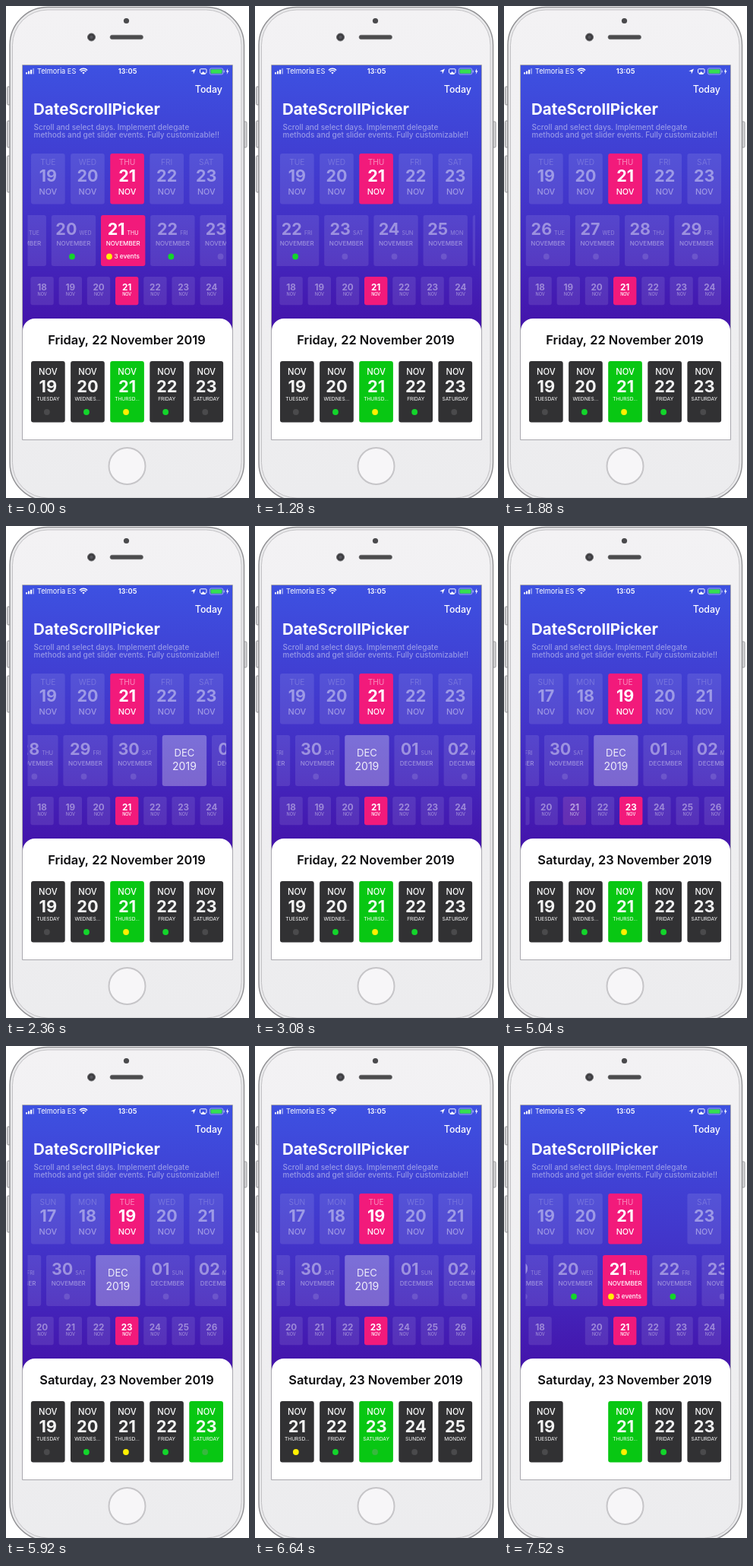
Animation of 320x647 px, one loop 7.56 s. Source, as an HTML page with a canvas:

```html
<!DOCTYPE html>
<html lang="en">
<head>
<meta charset="utf-8">
<title>DateScrollPicker</title>
<style>
html, body { margin: 0; width: 100%; height: 100%; overflow: hidden; background: #fff; }
canvas { display: block; width: 320px; height: 647px; }
</style>
</head>
<body>
<canvas id="stage"></canvas>
<script>
const W = 320, H = 647, LOOP = 7560;
const PINK = '#f21a7b', GREEN = '#08c713', DOT_GREEN = '#13d52b', YELLOW = '#fff000';
const TAP_TOP = 4050, TAP_SMALL = 4817, TAP_BOTTOM = 5900, TAP_TODAY = 7170, GLIDE = 320;
const DAYS = ['SUNDAY', 'MONDAY', 'TUESDAY', 'WEDNESDAY', 'THURSDAY', 'FRIDAY', 'SATURDAY'];
const FONT = 'Inter, "Open Sans", sans-serif';

const canvas = document.getElementById('stage');
const ctx = canvas.getContext('2d');
const dpr = window.devicePixelRatio || 1;
canvas.width = W * dpr;
canvas.height = H * dpr;

const white = a => `rgba(255,255,255,${a})`;
const clamp = v => Math.max(0, Math.min(1, v));
const ease = p => p < 0.5 ? 4 * p ** 3 : 1 - 4 * (1 - p) ** 3;
const glide = (t, start) => ease(clamp((t - start) / GLIDE));

function box(x, y, w, h, r, fill, stroke, line = 1) {
  ctx.beginPath();
  ctx.roundRect(x, y, w, h, r);
  if (fill) { ctx.fillStyle = fill; ctx.fill(); }
  if (stroke) { ctx.strokeStyle = stroke; ctx.lineWidth = line; ctx.stroke(); }
}

function circle(x, y, r, fill, stroke, line = 1) {
  ctx.beginPath();
  ctx.arc(x, y, r, 0, Math.PI * 2);
  if (fill) { ctx.fillStyle = fill; ctx.fill(); }
  if (stroke) { ctx.strokeStyle = stroke; ctx.lineWidth = line; ctx.stroke(); }
}

function poly(points, fill) {
  ctx.beginPath();
  points.forEach(([x, y]) => ctx.lineTo(x, y));
  ctx.closePath();
  ctx.fillStyle = fill;
  ctx.fill();
}

function text(s, x, y, size, weight, fill, align = 'center') {
  ctx.font = `${weight} ${size}px ${FONT}`;
  ctx.textAlign = align;
  ctx.fillStyle = fill;
  ctx.fillText(s, x, y);
}

function fadeDown(y0, y1, ...colors) {
  const g = ctx.createLinearGradient(0, y0, 0, y1);
  colors.forEach((c, i) => g.addColorStop(i / (colors.length - 1), c));
  return g;
}

function dateInfo(day) {
  const d = new Date(Date.UTC(2019, 10, day));
  return {
    num: String(d.getUTCDate()).padStart(2, '0'),
    name: DAYS[d.getUTCDay()],
    month: d.getUTCMonth() === 10 ? 'NOVEMBER' : 'DECEMBER'
  };
}

function dotColor(day, plain) {
  return day === 21 ? YELLOW : day === 20 || day === 22 ? DOT_GREEN : plain;
}

function phone() {
  ctx.fillStyle = '#fff';
  ctx.fillRect(0, 0, W, H);
  [[1.5, 106, 24], [1.5, 151, 35], [1.5, 197, 48], [313, 152, 34]].forEach(
    ([x, y, h]) => box(x, y, 4, h, 1.5, '#d5d5d7', '#8f8f92', 0.9));
  box(5, 1.5, 308.5, 649, 50, '#e9e9eb', '#8f8f92', 1.4);
  box(8.5, 5, 301.5, 642, 46.5, fadeDown(0, H, '#f3f2f4', '#ececee'), '#c3c2c5', 1);
  circle(158.5, 19.5, 3.6, '#4a4a4c');
  circle(112.5, 41, 5, '#3d3d40', '#6a6a6d');
  circle(112.5, 41, 2.2, '#55555b');
  box(137, 38.3, 43.5, 5.4, 2.7, '#4b4b4d', '#737375', 0.7);
  circle(159.5, 605, 24, '#f7f6f8', '#c6c5c8', 2);
  box(21.5, 77.5, 277, 493, 0, '#fff', '#a9a8ae', 1);
}

function statusBar() {
  for (let i = 0; i < 4; i++) {
    box(26 + i * 3, 87.2 - i * 1.7, 2.1, 2.3 + i * 1.7, 0.5, white(i < 3 ? 1 : 0.4));
  }
  text('Telmoria ES', 41, 89.3, 9.2, 400, '#fff', 'left');
  [2.4, 4.8, 7.2].forEach((r, i) => {
    ctx.beginPath();
    ctx.arc(102, 89.5, r, -Math.PI * 0.75, -Math.PI * 0.25);
    if (i) {
      ctx.strokeStyle = '#fff';
      ctx.lineWidth = 1.5;
      ctx.stroke();
    } else {
      ctx.lineTo(102, 89.5);
      ctx.fillStyle = '#fff';
      ctx.fill();
    }
  });
  text('13:05', 160, 89.3, 9.3, 600, '#fff');
  poly([[250, 82.5], [243.3, 85.8], [246.6, 86.1], [246.9, 89.5]], '#fff');
  box(255.5, 82.8, 8.5, 5.5, 1, null, '#fff', 1);
  poly([[259.7, 86], [263, 90], [256.5, 90]], '#fff');
  box(268.3, 82, 17.5, 8, 2, null, white(0.6), 0.8);
  box(269.5, 83.2, 15, 5.6, 1, '#35df52');
  box(286.6, 84.5, 1.2, 3, 0.6, white(0.6));
  poly([[292.2, 82], [289.8, 86.6], [291.4, 86.6], [290.7, 90], [293.5, 85.3], [291.8, 85.3]], '#fff');
}

function background() {
  ctx.fillStyle = fadeDown(78, 425, '#3d51e1', '#4236cb', '#4413aa');
  ctx.fillRect(22, 78, 276, 350);
  box(22, 411, 276, 159, [16, 16, 0, 0], '#fff');
}

// Cubic through the scroll keys: time, distance, speed.
const SCROLL = [[0, 0, 0.04], [1280, 164, 0.28], [1880, 422, 0.38], [3080, 658.8, 0]];

function middleScroll(t) {
  if (t >= TAP_TODAY) return 658.8 - 663.8 * glide(t, TAP_TODAY);
  for (let i = 0; i < SCROLL.length - 1; i++) {
    const [t0, a, va] = SCROLL[i], [t1, b, vb] = SCROLL[i + 1];
    if (t > t1) continue;
    const d = t1 - t0, u = (t - t0) / d, v = 1 - u;
    return v * v * (1 + 2 * u) * a + u * v * v * d * va
      + u * u * (3 - 2 * u) * b - u * u * v * d * vb;
  }
  return 658.8;
}

function rowState(t, tap, day) {
  const back = t >= TAP_TODAY;
  return {
    pos: back ? day + (21 - day) * glide(t, TAP_TODAY) : 21 + (day - 21) * glide(t, tap),
    selected: back || t < tap ? 21 : day,
    back
  };
}

function eachDay(state, x0, pitch, width, hidden, draw) {
  for (let day = 12; day < 31; day++) {
    const x = x0 + (day - state.pos) * pitch;
    if (x + width < 28 || x > 290 || (state.back && day === hidden)) continue;
    draw(day, x, x + width / 2, day === state.selected);
  }
}

function topRow(t) {
  eachDay(rowState(t, TAP_TOP, 19), 137.2, 52.1, 44.7, 22, (day, x, c, on) => {
    const d = dateInfo(day), ink = white(on ? 1 : 0.43);
    box(x, 194, 44.7, 66.6, 3, on ? PINK : white(0.1));
    text(d.name.slice(0, 3), c, 209, 10.2, 400, white(on ? 0.5 : 0.2));
    text(d.num, c, 230.7, 21.5, 700, ink);
    text('NOV', c, 248, 10.8, 500, ink);
  });
}

function middleRow(t) {
  const shift = middleScroll(t);
  for (let i = -5; i < 18; i++) {
    const x = 125 + i * 65.2 - shift, c = x + 29.2;
    if (x < -32 || x > 290) continue;
    if (i === 10) {
      box(x, 275, 58.4, 67, 3, white(0.3));
      text('DEC', c, 302.7, 13, 400, white(0.88));
      text('2019', c, 321.3, 14, 400, white(0.88));
      continue;
    }
    const day = 21 + i - (i > 10 ? 1 : 0), d = dateInfo(day), on = i === 0;
    const ink = white(on ? 1 : 0.42), name = d.name.slice(0, 3);
    box(x, 275, 58.4, 67, 3, on ? PINK : white(0.1));
    ctx.font = `400 7px ${FONT}`;
    const small = ctx.measureText(name).width;
    ctx.font = `700 21.5px ${FONT}`;
    const big = ctx.measureText(d.num).width;
    const left = c - (big + small + 3) / 2;
    text(d.num, left, 301, 21.5, 700, ink, 'left');
    text(name, left + big + 3, 301, 7, 400, white(on ? 0.95 : 0.36), 'left');
    text(d.month, c, 314.7, 8, 500, ink);
    circle(on ? x + 11 : c - 2, 329.5, 3.9, dotColor(day, white(0.13)));
    if (on) text('3 events', x + 17.5, 332.4, 8.2, 500, '#fff', 'left');
  }
}

function smallRow(t) {
  const fade = t >= TAP_SMALL && t < TAP_TODAY ? clamp(1 - (t - TAP_SMALL) / GLIDE) : 0;
  eachDay(rowState(t, TAP_SMALL, 23), 144, 37.2, 30.4, 19, (day, x, c, on) => {
    const glow = day === 21 ? fade : 0;
    const ink = white(on ? 1 : 0.42 + glow * 0.4);
    box(x, 356, 30.4, 37.3, 3, on ? PINK : white(0.1));
    if (glow) box(x, 356, 30.4, 37.3, 3, `rgba(242,26,123,${glow * 0.3})`);
    text(day, c, 373.7, 11.7, 700, ink);
    text('NOV', c, 381.3, 5.5, 500, ink);
  });
}

function bottomRow(t) {
  eachDay(rowState(t, TAP_BOTTOM, 23), 137.2, 52.1, 44.7, 20, (day, x, c, on) => {
    const d = dateInfo(day);
    const name = d.name.length > 8 || day === 21 ? d.name.slice(0, 6) + '...' : d.name;
    box(x, 467, 44.7, 80.6, 3, on ? GREEN : '#313133');
    text('NOV', c, 485, 11.2, 500, '#fff');
    text(d.num, c, 508, 21.8, 700, white(0.94));
    text(name, c, 519.3, 6.6, 400, '#fff');
    circle(c - 1.5, 534, 3.9, dotColor(day, on ? '#38b83e' : '#4a4a4c'));
  });
}

function heading(t) {
  const label = t < TAP_TOP ? 'Friday, 22' : t < TAP_SMALL ? 'Tuesday, 19' : 'Saturday, 23';
  text('Today', 285, 113.8, 12.4, 500, '#fff', 'right');
  text('DateScrollPicker', 36, 142.6, 20.6, 700, '#fff', 'left');
  text('Scroll and select days. Implement delegate', 36.5, 163.2, 10, 500, white(0.45), 'left');
  text('methods and get slider events. Fully customizable!!', 36.5, 173.2, 10, 500, white(0.45), 'left');
  text(label + ' November 2019', 159, 445.2, 16.4, 600, '#0c0c0e');
}

function frame(now) {
  const t = now % LOOP;
  ctx.setTransform(dpr, 0, 0, dpr, 0, 0);
  phone();
  background();
  statusBar();
  heading(t);
  ctx.save();
  ctx.beginPath();
  ctx.rect(28.5, 180, 261.5, 380);
  ctx.clip();
  topRow(t);
  middleRow(t);
  smallRow(t);
  bottomRow(t);
  ctx.restore();
}

const start = performance.now();
function loop() {
  frame(performance.now() - start);
  requestAnimationFrame(loop);
}
loop();
</script>
</body>
</html>
```
